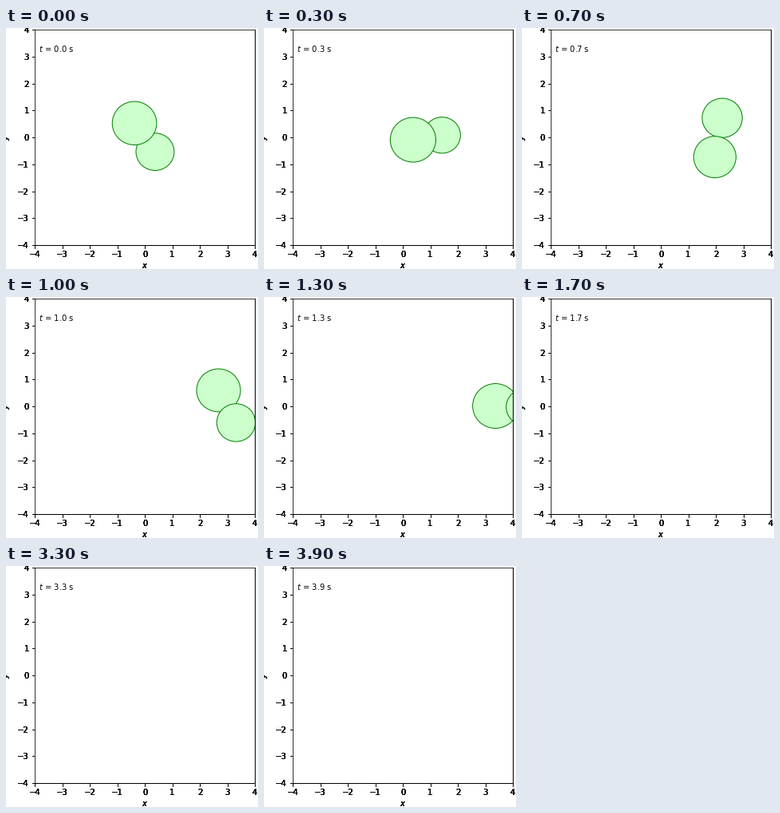
These frames come from a looping animation (316x302 px, 4 s). A matplotlib script:

```python
import numpy as np
import matplotlib.pyplot as plt
from matplotlib.animation import FuncAnimation

WIDTH, HEIGHT, DPI = 316, 302, 72
FRAMES, INTERVAL = 40, 100
LAYERS = 5            # stacked axes darken the antialiased labels and ticks

SPEED = 3.0           # drift of the pair along x
OMEGA = 3.0           # rotation rate, rad/s
PHASE = -np.pi / 4
TILT = np.pi / 4      # the orbit is turned about the y axis
RADIUS = 0.75
DEPTH_SCALE = 0.2     # nearer discs look larger

plt.rcParams.update({"font.family": "DejaVu Sans", "font.size": 10})


def make_axes(fig, layer):
    box = [36 / WIDTH, 29.8 / HEIGHT, 276 / WIDTH, 270 / HEIGHT]
    ax = fig.add_axes(box, label=f"layer{layer}")
    ax.set(xlim=(-4, 4), ylim=(-4, 4),
           xticks=range(-4, 5), yticks=range(-4, 5))
    ax.set_xlabel("$x$")
    ax.set_ylabel("$y$", labelpad=7)
    return ax


def place(disc, t, sign):
    angle = OMEGA * t + PHASE
    x = sign * RADIUS * np.cos(angle) * np.cos(TILT)
    y = sign * RADIUS * np.sin(angle)
    z = -sign * RADIUS * np.cos(angle) * np.sin(TILT)
    disc.center = (SPEED * t + x, y)
    disc.radius = RADIUS * (1 + DEPTH_SCALE * z)


fig = plt.figure(figsize=(WIDTH / DPI, HEIGHT / DPI), dpi=DPI)
ax = [make_axes(fig, i) for i in range(LAYERS)][-1]

discs = [ax.add_patch(plt.Circle((0, 0), RADIUS, fc="#ccffcc", ec="green", lw=1))
         for _ in range(2)]
clock = ax.text(0.019, 0.898, "", transform=ax.transAxes)


def update(i):
    t = i * INTERVAL / 1000
    for disc, sign in zip(discs, (1, -1)):
        place(disc, t, sign)
    clock.set_text(f"$t$ = {t:.1f} s")
    return [*discs, clock]


def init():
    return update(0)


anim = FuncAnimation(fig, update, frames=FRAMES, init_func=init,
                     interval=INTERVAL, repeat=True, repeat_delay=0)
plt.show()
```
